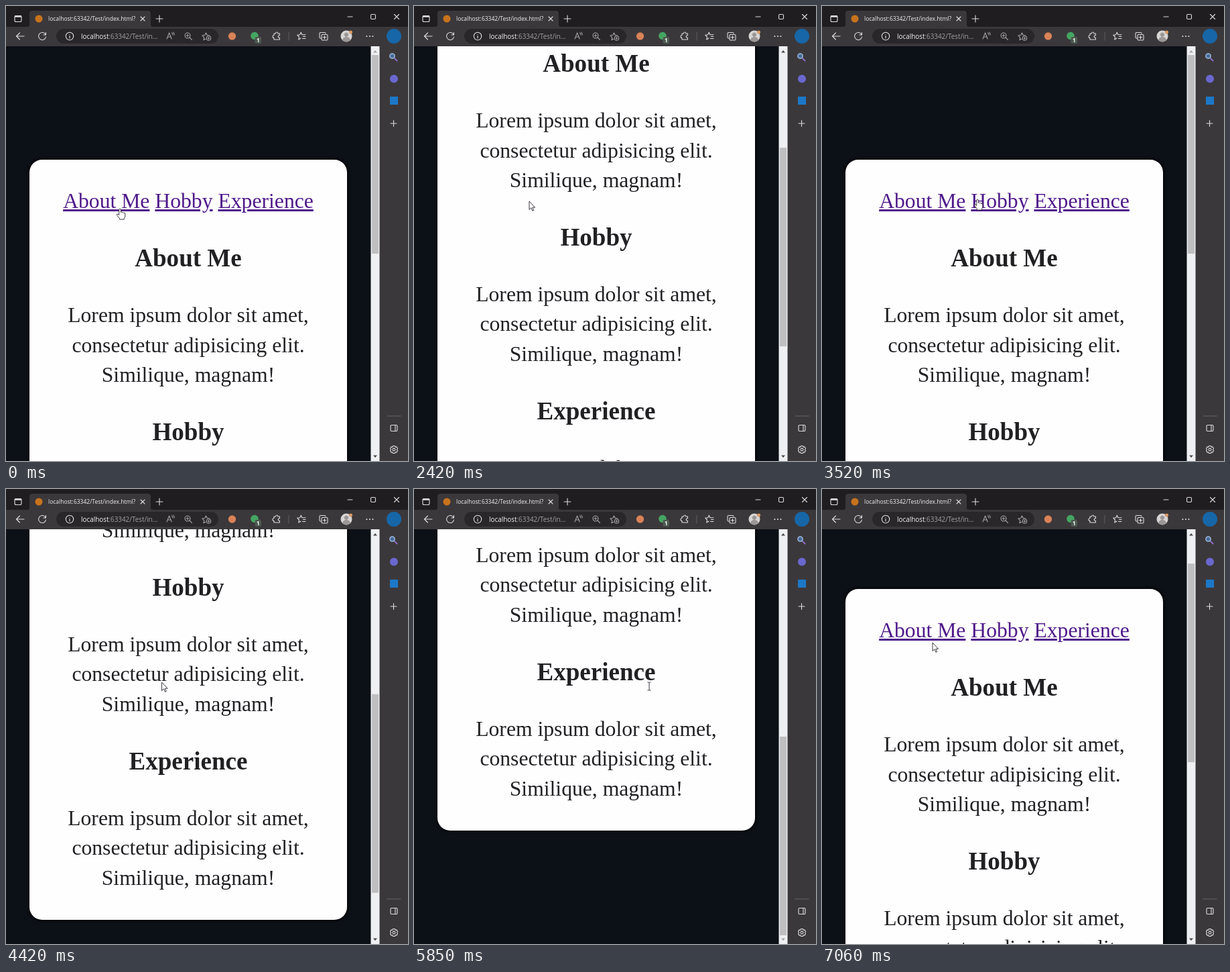
Write an HTML page that moves like this. It is 600 px wide and 678 px high and loops after 7090 ms.

```html
<!DOCTYPE html>
<html lang="en">
<head>
<meta charset="utf-8">
<title>Smooth scroll</title>
<style>
  html, body { margin: 0; width: 100%; height: 100%; overflow: hidden; background: #3b383b; }
  #stage { position: relative; width: 600px; height: 678px; overflow: hidden; }
  #view { position: absolute; top: 60px; width: 545px; height: 618px; overflow: hidden; background: #0c1017; }
  #card {
    position: absolute; left: 35px; top: 169px; width: 474px; padding: 40px 0; border-radius: 19px;
    background: #fffeff; color: #212124; box-shadow: 0 0 4px 1px #000; text-align: center;
    font: 31.66px/1.4 "Liberation Serif", serif;
  }
  a { color: #4f1a8a; text-decoration: underline 2.5px; }
  h3 { font-size: 1.17em; margin: 1em 0; }
  p { margin: 0; }
  svg { position: absolute; left: 0; top: 0; font-family: "Open Sans", sans-serif; }
  .line { fill: none; stroke: #dedcde; stroke-width: 1.1; stroke-linecap: round; stroke-linejoin: round; }
  .dim { stroke: #a3a0a3; }
</style>
</head>
<body>
<div id="stage">
  <div id="view">
    <div id="card">
      <nav><a>About Me</a> <a>Hobby</a> <a>Experience</a></nav>
    </div>
  </div>
  <svg width="600" height="678">
    <!-- window frame -->
    <path fill="#3b383b" d="M0 31H600V60H0ZM557 60H600V678H557Z"/>
    <path fill="#201d21" d="M0 0H600V31H0Z"/>
    <path fill="#3b383b" d="M32 31Q35 31 35 28V11Q35 7 39 7H212Q216 7 216 11V28Q216 31 219 31Z"/>
    <rect x="75" y="34" width="242" height="22" rx="11" fill="#2a272a"/>

    <!-- title bar -->
    <circle cx="49" cy="19" r="5.5" fill="#c8731c"/>
    <text x="63" y="22.2" font-size="8.5" fill="#f1eff1">localhost:63342/Test/index.html?</text>
    <g class="line">
      <rect x="13" y="14.5" width="10" height="9" rx="2"/>
      <path stroke-width="2.4" d="M14 15.5H22"/>
      <path d="M201 16l6 6M207 16l-6 6M224 19h10M229 14v10M510 16h7M579.500 12.500l7 7M586.500 12.500l-7 7"/>
      <rect x="544.5" y="12.500" width="7" height="7" rx="1.500"/>
    </g>

    <!-- toolbar -->
    <g class="line">
      <path d="M27 45H15.500M20.500 40l-5 5 5 5"/>
      <path d="M59 42.500A5.500 5.500 0 1 0 59.500 46M59.500 39.500V43H56"/>
      <circle cx="95" cy="45" r="5.700"/>
      <path d="M95 44.500V48M95 42.200V42.300"/>
      <g class="dim">
        <path d="M240 49l3.600-9 3.600 9M241.300 46h4.600M247.500 40q1.500 1.500 1.500 3M249.500 39q1.800 2 1.800 4"/>
        <circle cx="271" cy="44" r="4"/>
        <path d="M274 47l3.500 3.500M269 44h4M271 42v4"/>
        <path d="M298 49l-3 1.800.7-4-2.800-2.800 3.800-.5 1.800-3.600 1.800 3.600 3.500.5"/>
        <circle cx="302.500" cy="48" r="3.200"/>
        <path d="M301 48h3M302.500 46.500v3"/>
      </g>
      <path d="M400 41h2.500q0-2 1.700-2t1.700 2h2.500v2.800q-2.200 0-2.200 1.700t2.200 1.700V50h-8.400v-2.500q-2 0-2-2t2-2Z"/>
      <path stroke="#5d5a5d" d="M422 39.500V51"/>
      <path d="M440 48l-3.300 2 .8-4-2.800-2.800 4-.5 1.600-3.500 1.600 3.500h5M443.500 45.500h3.500M442.500 48.500h4.500"/>
      <path d="M470.500 48h-1q-1.500 0-1.500-1.500V41q0-1.500 1.500-1.500h6q1.500 0 1.500 1.500"/>
      <rect x="471" y="42.500" width="9" height="8.500" rx="1.500"/>
      <path d="M475.500 44.500v4.500M473.200 46.800h4.600"/>
    </g>
    <text x="112" y="48.600" font-size="9.900" fill="#f3f1f3">localhost<tspan fill="#a3a0a3">:63342/Test/in...</tspan></text>
    <circle cx="337.500" cy="45" r="5.700" fill="#d98257"/>
    <circle cx="371" cy="44.500" r="5.800" fill="#45a663"/>
    <rect x="371.500" y="46" width="9.500" height="10" rx="2" fill="#4c5a50"/>
    <text x="374" y="54" font-size="8" font-weight="bold" fill="#fff">1</text>
    <circle cx="508" cy="45" r="8.500" fill="#d8d5d4"/>
    <path fill="#9b9796" d="M508 39.500a3.200 3.200 0 1 1-.1 0ZM502 51q1-5 6-5t6 5q-6 4.500-12 0Z"/>
    <circle cx="514.500" cy="39" r="2.500" fill="#d99a66"/>
    <path fill="#dedcde" d="M537.500 44.200h1.800v1.800h-1.800ZM542 44.200h1.800v1.800H542ZM546.500 44.200h1.800v1.800h-1.800Z"/>
    <circle cx="579" cy="45" r="11" fill="#1767a8"/>

    <!-- sidebar -->
    <path stroke="#8d6cc9" stroke-width="2" stroke-linecap="round" d="M580 78l3.500 3.500"/>
    <circle cx="576.500" cy="74.500" r="3.700" fill="#4a6f9c" stroke="#a9c5e6" stroke-width="1.300"/>
    <circle cx="579" cy="108.500" r="6" fill="#6a68cf"/>
    <rect x="573" y="135" width="12" height="12" fill="#1c78c6"/>
    <g class="line">
      <path d="M574 175h9M578.500 170.500v9"/>
      <path stroke="#6a676a" d="M569 611h20"/>
      <rect x="574" y="624.500" width="10" height="9" rx="1.500"/>
      <path d="M581 625v8"/>
      <circle cx="579" cy="661" r="1.900"/>
      <path d="M577.500 655.500h3l.6 1.800 1.900-.4 1.600 2.600-1.300 1.500 1.300 1.500-1.600 2.600-1.900-.4-.6 1.800h-3l-.6-1.800-1.900.4-1.600-2.600 1.300-1.500-1.300-1.500 1.600-2.600 1.900.4Z"/>
    </g>

    <!-- scrollbar -->
    <path fill="#eff0f3" d="M544.500 60H557.500V678H544.500Z"/>
    <rect id="thumb" x="546" y="73" width="10" height="296" fill="#bfbfc2"/>
    <path id="up" d="M548 69.500l3-3.500 3 3.500Z"/>
    <path id="down" d="M548 669.500l3 3.500 3-3.500Z"/>

    <!-- pointer shapes, hot spot at the origin -->
    <g id="pointer" fill="#fff" stroke="#26232b" stroke-width=".9" stroke-linejoin="round">
      <path id="arrow" d="M0 0V12.500L2.900 9.800 4.900 14.300 6.700 13.500 4.800 9.200H8.600Z"/>
      <path id="hand" d="M-1.300 1Q0-.8 1.300 1V5.200Q2.800 4.600 3.500 5.700 4.800 5 5.600 6.300 7.800 5.800 7.800 8V11Q7.800 13 6.300 14.200V16H-.5V14.500L-4.600 9.500Q-4.800 7.600-3 8L-1.300 9.500Z"/>
      <path id="beam" fill="none" d="M-2.500-6H-.7L0-5.400.7-6H2.500M0-5.400V5.400M-2.500 6H-.7L0 5.400.7 6H2.500"/>
    </g>
  </svg>
</div>
<script>
const LOOP = 7090, MAX_SCROLL = 621, THUMB_TRAVEL = 296;
const $ = id => document.getElementById(id);
const linear = k => k, smooth = k => k * k * (3 - 2 * k);

for (const title of ['About Me', 'Hobby', 'Experience']) {
  $('card').insertAdjacentHTML('beforeend',
    `<h3>${title}</h3><p>Lorem ipsum dolor sit amet,<br>consectetur adipisicing elit.<br>Similique, magnam!</p>`);
}

// time, scroll offset, easing towards the next key
const scrollKeys = [
  [0, 0, linear], [980, 0, smooth], [1240, 290, linear],
  [2870, 290, linear], [3150, 0, linear],
  [3620, 0, smooth], [3950, 549, linear],
  [4380, 549, linear], [4730, 30, linear], [4810, 0, linear],
  [5500, 0, smooth], [5840, MAX_SCROLL, linear],
  [5930, MAX_SCROLL, linear], [6360, 155, linear], [6480, 80, linear], [LOOP, 80, linear]
];
// time, x, y, shape until the next key
const pointerKeys = [
  [0, 170, 302, 'hand'], [1780, 170, 302, 'arrow'], [2200, 172, 291, 'arrow'],
  [3160, 172, 291, 'arrow'], [3450, 232, 288, 'hand'],
  [4400, 232, 288, 'arrow'], [4730, 277, 288, 'arrow'], [5080, 320, 290, 'hand'],
  [5320, 351, 294, 'hand'], [5840, 351, 294, 'beam'], [5930, 351, 294, 'arrow'],
  [6360, 265, 282, 'arrow'], [7060, 165, 229, 'arrow'], [LOOP, 165, 229, 'arrow']
];

function segment(keys, t) {
  const i = keys.findIndex(key => key[0] > t), a = keys[i - 1], b = keys[i];
  return [a, b, (t - a[0]) / (b[0] - a[0])];
}

function draw() {
  const t = performance.now() % LOOP;

  const [s0, s1, sk] = segment(scrollKeys, t);
  const scroll = s0[1] + (s1[1] - s0[1]) * s0[2](sk);
  $('card').style.transform = `translateY(${-Math.round(scroll)}px)`;
  $('thumb').setAttribute('y', 73 + scroll * THUMB_TRAVEL / MAX_SCROLL);
  $('up').setAttribute('fill', scroll < 1 ? '#a5a5a8' : '#444');
  $('down').setAttribute('fill', scroll > MAX_SCROLL - 1 ? '#a5a5a8' : '#444');

  const [p0, p1, pk] = segment(pointerKeys, t);
  const [x, y] = [1, 2].map(i => p0[i] + (p1[i] - p0[i]) * smooth(pk));
  $('pointer').setAttribute('transform', `translate(${x} ${y})`);
  for (const shape of ['arrow', 'hand', 'beam']) {
    $(shape).style.display = shape === p0[3] ? '' : 'none';
  }
  requestAnimationFrame(draw);
}
draw();
</script>
</body>
</html>
```
